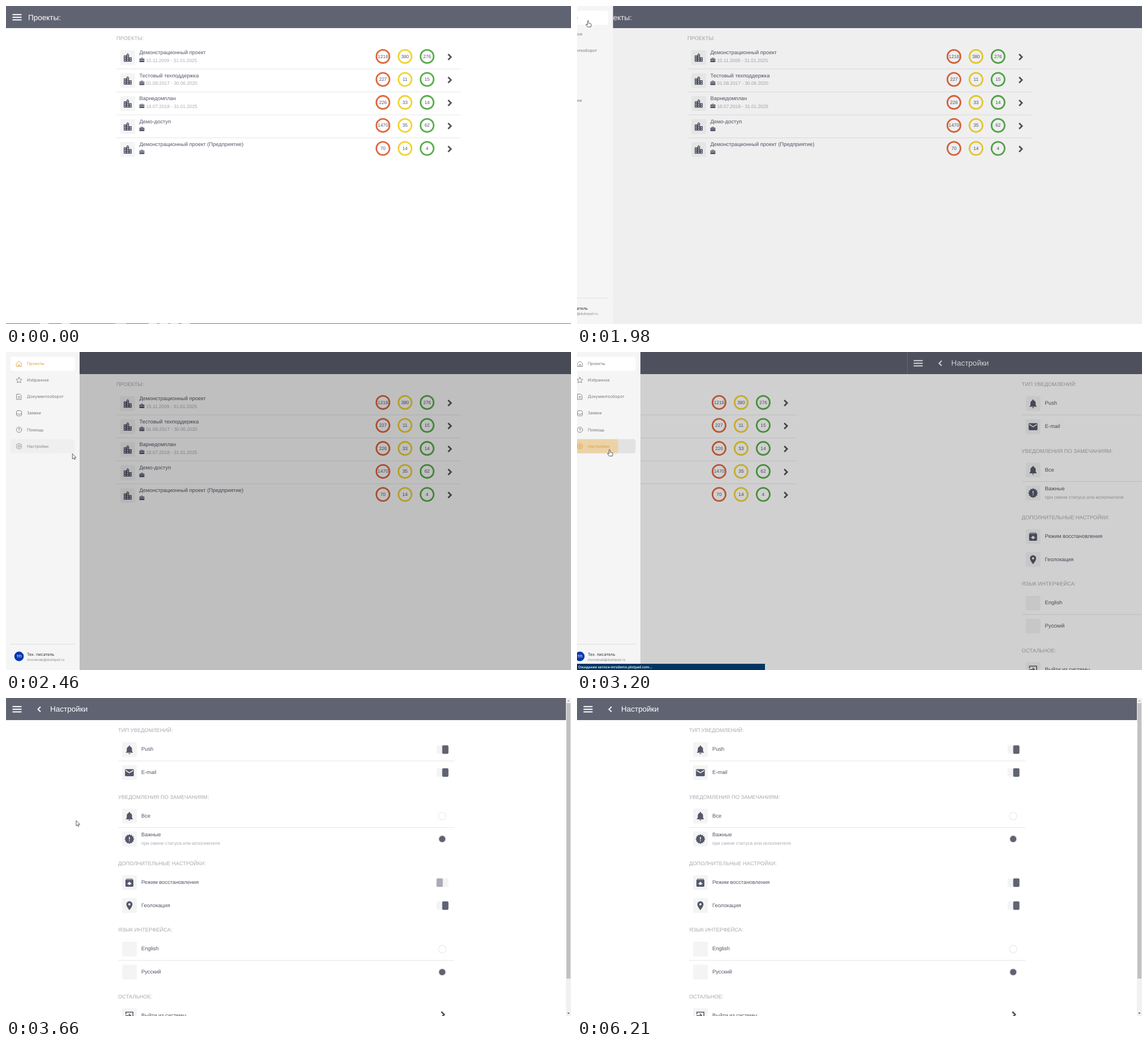
An HTML page that plays this animation: 998x561 px, repeating every 8130 ms.

```html
<!DOCTYPE html>
<html lang="ru">
<head>
<meta charset="utf-8">
<title>Настройки</title>
<style>
html, body { margin: 0; width: 100%; height: 100%; overflow: hidden; background: #fff; }
svg { display: block; width: 998px; height: 561px; }
text { font-family: "Liberation Sans", Arial, sans-serif; white-space: pre; text-rendering: geometricPrecision; }
.menu text { font-family: Inter, sans-serif; }
.status text { font-family: "Open Sans", sans-serif; }
.line { fill: none; stroke: currentColor; stroke-linejoin: round; stroke-linecap: round; }
</style>
</head>
<body>
<svg id="stage" viewBox="0 0 998 561" xmlns="http://www.w3.org/2000/svg"></svg>
<script>
const LOOP = 8130, W = 998, PANEL = 130;
const DARK = '#606372', INK = '#54586a', PALE = '#a9abb2', BOX = '#f4f4f4', GOLD = '#d9a03f';

// ---- drawing helpers ----
const rect = (x, y, w, h, fill, r = 0, more = '') =>
  `<rect x="${x}" y="${y}" width="${w}" height="${h}" rx="${r}" fill="${fill}" ${more}/>`;
const circle = (x, y, r, fill, more = '') => `<circle cx="${x}" cy="${y}" r="${r}" fill="${fill}" ${more}/>`;
const path = (d, fill, more = '') => `<path d="${d}" fill="${fill}" ${more}/>`;
const line = (d, w, color = 'currentColor') => path(d, 'none', `stroke="${color}" stroke-width="${w}"`);
const group = (x, y, body, scale = 1, more = '') =>
  `<g transform="translate(${x} ${y}) scale(${scale})" ${more}>${body}</g>`;
const text = (x, y, s, size, fill, more = '') =>
  `<text x="${x}" y="${y + size * .35}" font-size="${size}" fill="${fill}" ${more}>${s}</text>`;
const star = (n, outer, inner) => 'M' + Array.from({ length: 2 * n }, (_, i) => {
  const r = i % 2 ? inner : outer, a = Math.PI * i / n - Math.PI / 2;
  return (r * Math.cos(a)).toFixed(2) + ' ' + (r * Math.sin(a)).toFixed(2);
}).join('L') + 'z';

// ---- icons on a 24 unit grid ----
const windows = [[5, 9, 3], [11, 5, 4], [17, 13, 2]].map(([x, y, n]) =>
  Array.from({ length: n }, (_, i) => rect(x, y + 4 * i, 2, 2, BOX)).join('')).join('');
const icons = {
  city: path('M15 11V5l-3-3-3 3v2H3v14h18V11z', INK) + windows,
  bell: path('M4 19v-1l2-2v-5a6 6.5 0 0 1 4.5-6.3V4a1.5 1.5 0 0 1 3 0v.7a6 6.5 0 0 1 4.5 6.3v5l2 2v1zM10 20h4a2 2 0 0 1-4 0z', INK),
  mail: rect(2, 4, 20, 16, INK, 2) + line('M3.5 7l8.5 5.3L20.500 7', 2, BOX),
  seal: group(12, 12, path(star(12, 11, 9), INK)) + line('M12 7v6M12 15v2', 2, BOX),
  box: path('M3 6.500L5.500 3h13L21 6.500V19q0 2-2 2H5q-2 0-2-2z', INK) +
    path('M12 9.500l5.500 5.500H14v2h-4v-2H6.500z', BOX) + line('M5.500 4.700h13', 1, BOX),
  pin: path('M12 22S5 14.300 5 9a7 7 0 0 1 14 0c0 5.300-7 13-7 13z', INK) + circle(12, 9, 2.500, BOX),
  exit: line('M4 9V4h16v16H4v-5M3 12h12M10.800 7.700L15.100 12l-4.300 4.300', 2, INK),
  none: ''
};
const tile = (x, y, icon) => rect(x, y, 26, 26, BOX, 2) + group(x + 3.6, y + 3.8, icons[icon], .78);
const burger = rect(11.5, 14.2, 16, 2, '#fff') + rect(11.5, 18.9, 16, 2, '#fff') + rect(11.5, 23.5, 16, 2, '#fff');
const chevron = (x, y) => line(`M${x - 3} ${y - 5}l5 5-5 5`, 2.8, '#56575c');
const heading = (x, y, s) => text(x, y, s, 9.36, PALE);
const divider = (x, y, w) => rect(x, y - .5, w, 1, '#e6e6e6');

// ---- project list ----
const projects = [
  ['Демонстрационный проект', '15.11.2009 - 31.01.2025', 1218, 380, 276],
  ['Тестовый техподдержка', '01.08.2017 - 30.06.2020', 227, 11, 15],
  ['Варнедомплан', '18.07.2018 - 31.01.2025', 226, 33, 14],
  ['Демо-доступ', '', 1470, 35, 62],
  ['Демонстрационный проект (Предприятие)', '', 70, 14, 4]
];
const rings = ['#e0683f', '#f1d332', '#59ad4b'];
const briefcase = path('M0 2h2.500V.3h4V2H9v2H0zM0 4.700h9V7q0 1-1 1H1q-1 0-1-1z', INK) + rect(3.2, 1, 2.6, 1, '#fff');
const projectRow = ([name, dates, ...counts], i) => group(0, 40.55 * i,
  tile(202, 78, 'city') + text(235.5, 82, name, 9.36, INK) +
  group(235.5, 91, briefcase) + text(247.5, 96, dates, 8.3, PALE) +
  counts.map((n, k) => circle(665.8 + 39 * k, 89, 11.6, 'none', `stroke="${rings[k]}" stroke-width="2.8"`) +
    text(665.8 + 39 * k, 88.7, n, 8.3, INK, 'text-anchor="middle"')).join('') +
  chevron(784, 90) + (i < 4 ? divider(195, 111, 608) : ''));
const listPage = rect(0, 0, W, 561, '#fff') + rect(0, 0, W, 39, DARK) + burger +
  text(39, 19.8, 'Проекты:', 13.52, '#fff') + heading(195, 57, 'ПРОЕКТЫ:') +
  projects.map(projectRow).join('');

// ---- settings ----
const toggle = (y, id) => rect(760.5, y - 7.5, 21, 15, BOX, 2) +
  rect(770.5, y - 7.5, 11, 15, DARK, 2, id ? `id="${id}"` : '');
const radio = (y, on) => circle(770.5, y, 6.7, '#fff', 'stroke="#ededed" stroke-width="1.4"') +
  (on ? circle(770.5, y, 5.6, DARK) : '');
const setting = (y, icon, name, control, note) => tile(205, y - 13, icon) +
  text(239, note ? y - 7.6 : y - .8, name, 9.36, INK) + (note ? text(239, y + 7.2, note, 8.3, PALE) : '') + control;
const settingsBody =
  heading(198, 57, 'ТИП УВЕДОМЛЕНИЙ:') + setting(91, 'bell', 'Push', toggle(91)) +
  divider(198, 111, 594) + setting(131.5, 'mail', 'E-mail', toggle(131.5)) +
  heading(198, 174.3, 'УВЕДОМЛЕНИЯ ПО ЗАМЕЧАНИЯМ:') + setting(208.3, 'bell', 'Все', radio(208.3)) +
  divider(198, 228.5, 594) +
  setting(248.7, 'seal', 'Важные', radio(248.7, 1), 'при смене статуса или исполнителя') +
  heading(198, 291.7, 'ДОПОЛНИТЕЛЬНЫЕ НАСТРОЙКИ:') +
  setting(325.7, 'box', 'Режим восстановления', toggle(325.7, 'knob')) +
  setting(366.2, 'pin', 'Геолокация', toggle(366.2)) +
  heading(198, 409, 'ЯЗЫК ИНТЕРФЕЙСА:') + setting(443, 'none', 'English', radio(443)) +
  divider(198, 463, 594) + setting(483.5, 'none', 'Русский', radio(483.5, 1)) +
  heading(198, 526.5, 'ОСТАЛЬНОЕ:') + setting(560.3, 'exit', 'Выйти из системы', chevron(772, 558.5));
const scrollbar = rect(989, 0, 9, 561, '#f1f1f1') + rect(990, 9, 7, 486, '#c1c1c1') +
  path('M991.500 6l2-2.500 2 2.500z', '#a0a0a0') + path('M991.500 555l2 2.500 2-2.500z', '#505050');
const settingsPage = rect(0, 0, W, 561, '#fff') + rect(0, 0, W, 39, DARK) +
  rect(0, 0, .6, 39, '#fff', 0, 'opacity=".1"') + burger +
  line('M61 15.500l-4.500 4.400 4.500 4.400', 2, '#fff') + text(78, 19.5, 'Настройки', 13.52, '#fff') +
  `<g id="body">${settingsBody}</g><g id="scroll">${scrollbar}</g>`;

// ---- side menu ----
const round = (x, y, w, h, r) => rect(x, y, w, h, 'none', r);
const menu = [
  ['Проекты', '<path d="M-4.500-.8L0-4.600 4.500-.8V4.600H-4.500zM-1.500 4.600V1.500h3v3.100"/>'],
  ['Избранное', `<path d="${star(5, 5.3, 2.7)}"/>`],
  ['Документооборот', '<path d="M-3.900-4.700H1.300L3.900-2V4.700H-3.900zM-1.700-.5h3.400M-1.700 2h3.400"/>'],
  ['Заявки', round(-4.6, -4.6, 9.2, 9.2, 2.4) + '<path d="M-4.600 1h2.500q2.100 2.600 4.200 0h2.500"/>'],
  ['Помощь', circle(0, 0, 4.8, 'none') + '<path d="M-1.300-1q.2-1.400 1.400-1.400 1.300.1 1.300 1.300Q1.300-.2 0 .5M0 2.300v.1"/>'],
  ['Настройки', `<path d="${star(8, 5, 4.4)}"/>` + circle(0, 0, 1.9, 'none')]
];
const menuRow = ([name, icon], i) => `<g id="item${i}" color="#777">` +
  group(23, 20.8 + 29.1 * i, icon, 1, 'class="line" stroke-width=".85"') +
  text(37, 20.6 + 29.1 * i, name, 7.2, 'currentColor') + '</g>';
const sideMenu = rect(0, 0, PANEL, 561, '#f5f5f5') + rect(8, 8.3, 113.5, 25, '#fff', 4) +
  rect(8, 153.8, 113.5, 25, '#000', 4, 'id="hover"') +
  `<clipPath id="clip">${rect(8, 153.8, 113.5, 25, '#000', 4)}</clipPath>` +
  `<g clip-path="url(#clip)">${circle(54, 166, 0, '#f3ca80', 'id="ripple"')}</g>` +
  menu.map(menuRow).join('') +
  line('M8 515.500H122', .8, '#d9d9d9') + circle(23, 537, 8.4, '#0a38b0') +
  text(23, 537, 'ТП', 6, '#fff', 'text-anchor="middle" font-weight="600"') +
  text(37, 533.8, 'Тех. писатель', 7.2, '#333') + text(37, 543, 'mvorenak@dulmpet.ru', 6.2, '#888');

// ---- everything else ----
const segments = [[60, 15], [98, 15], [193, 19], [252, 15], [271, 16], [290, 15], [310, 15]];
const taskbar = rect(0, 560, W, 1, '#77777a') +
  segments.map(([x, w]) => rect(x, 560, w, 1, '#bfe3f8', 0, x === 193 ? 'id="task"' : '')).join('');
const status = rect(0, 550, 332, 11, '#003563') +
  text(2, 555.4, 'Ожидание service-mrsdemo.plotpad.com…', 6.2, '#fff', 'font-weight="600"');
const outline = 'stroke="#333" stroke-width=".8" stroke-linejoin="round"';
const arrow = path('M0 0v9.300l2.200-2 1.400 3 1.500-.7-1.400-2.900h3z', '#fff', outline);
const hand = path('M-1 1a1 1 0 0 1 2 0v3.800l3.700.8q1.100.3 1 1.400l-.7 4.500H-.8L-3.700 7.600q-.2-1.400 1.200-1L-1 7.800z', '#fff', outline);

document.getElementById('stage').innerHTML =
  `<g id="list">${listPage}</g><g id="settings">${settingsPage}</g><g id="taskbar">${taskbar}</g>` +
  rect(0, 0, W, 561, '#000', 0, 'id="shade"') + `<g id="panel" class="menu">${sideMenu}</g>` +
  `<g id="status" class="status">${status}</g>` +
  `<g id="cursor"><g id="arrow">${arrow}</g><g id="hand">${hand}</g></g>`;

// ---- motion ----
const el = id => document.getElementById(id);
const set = (id, name, value) => el(id).setAttribute(name, value);
const show = (id, on) => set(id, 'visibility', on ? 'visible' : 'hidden');
const move = (id, x, y = 0) => set(id, 'transform', `translate(${x.toFixed(2)} ${y.toFixed(2)})`);
const part = (t, start, length) => Math.min(1, Math.max(0, (t - start) / length));
const easeOut = (p, power) => 1 - (1 - p) ** power;
const easeInOut = p => p < .5 ? 2 * p * p : 1 - 2 * (1 - p) ** 2;

// time, x, y of the pointer tip
const route = [
  [270, 213, 556], [400, 160, 470], [560, 50, 310], [710, 8, 256],
  [1060, 8, 256], [1200, 38, 150], [1380, 77.5, 57.5], [1520, 52, 30], [1680, 21, 15], [1870, 19.5, 25.5],
  [2060, 19.5, 25.5], [2200, 48, 80], [2340, 98, 150], [2460, 117.5, 179.5], [2600, 88, 176], [2760, 57.5, 172],
  [3440, 57.5, 172], [3540, 76, 184], [3660, 123, 216], [3800, 250, 258], [4000, 490, 306],
  [4180, 690, 329], [4370, 766, 333], [4460, 767.5, 332.5], [5140, 767.5, 332.5], [5300, 768.5, 332],
  [5910, 768.5, 332], [5990, 650, 350], [6080, 370, 420], [6190, 96, 484]
];
const handTimes = [[1640, 2110], [2560, 3500], [4400, 5920]];
function pointer(t) {
  const i = Math.max(1, route.findIndex(k => k[0] >= t));
  const [a, b] = [route[i - 1], route[i]], p = part(t, a[0], b[0] - a[0]);
  move('cursor', a[1] + (b[1] - a[1]) * p, a[2] + (b[2] - a[2]) * p);
  const seen = t >= 270 && t < 6190, grip = handTimes.some(([s, e]) => t >= s && t < e);
  show('arrow', seen && !grip);
  show('hand', seen && grip);
}

function draw(t) {
  const open = part(t, 1910, 280), close = part(t, 3130, 270);
  move('panel', PANEL * (easeOut(open, 2.3) - 1 - easeInOut(close)));
  set('shade', 'opacity', .25 * (open - close));

  const slide = W * easeOut(part(t, 3130, 400), 2.75);
  const settled = t >= 3530;
  move('list', -slide);
  move('settings', W - slide);
  move('body', settled ? 0 : 4.5);
  show('scroll', settled);

  set('hover', 'opacity', .025 * part(t, 2420, 40) + .053 * part(t, 2560, 150));
  set('ripple', 'r', 37 * part(t, 3030, 170) + 30 * part(t, 3200, 130));
  set('ripple', 'opacity', .6 * (1 - part(t, 3230, 200)));
  set('item0', 'color', t < 3100 ? GOLD : '#777');
  set('item5', 'color', t < 3060 ? (t > 2420 ? '#858585' : '#777') : GOLD);

  const flip = part(t, 4620, 210);
  set('knob', 'x', 760.5 + 10 * easeInOut(flip));
  set('knob', 'fill', `rgb(${[[170, 96], [171, 99], [179, 114]].map(([a, b]) => Math.round(a + (b - a) * flip))})`);

  show('taskbar', t < 1850);
  set('task', 'opacity', .7 + .3 * part(t, 20, 40));
  show('status', t >= 3140 && t < 3590);
  pointer(t);
}

const start = performance.now();
function tick() {
  draw((performance.now() - start) % LOOP);
  requestAnimationFrame(tick);
}
draw(0);
requestAnimationFrame(tick);
</script>
</body>
</html>
```
